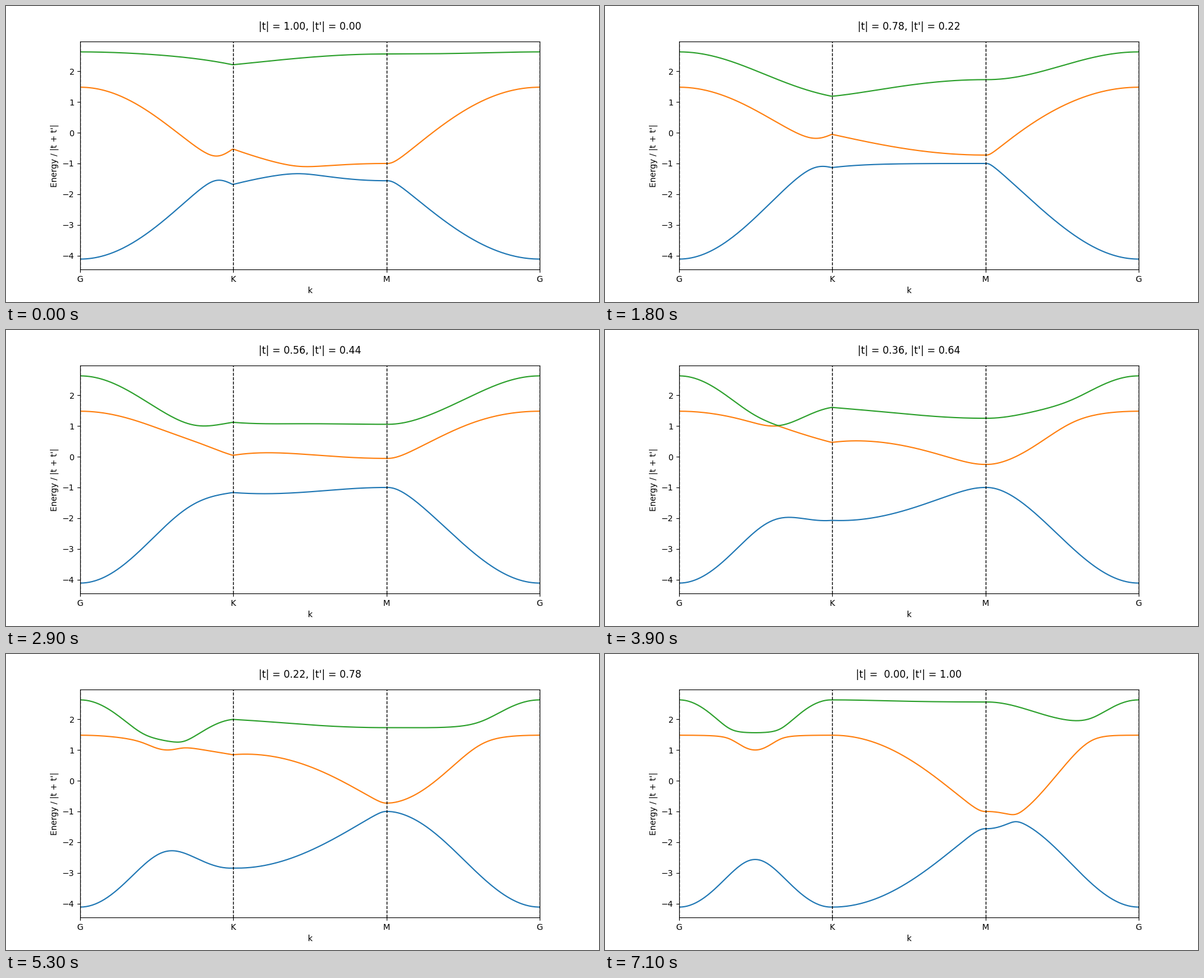
A matplotlib script that plays this animation: 1000x500 px, repeating every 9.1 s.

```python
import numpy as np
import matplotlib.pyplot as plt
from matplotlib.animation import FuncAnimation

STEP_MS = 50
HOLD = 15                    # frames a paused picture stays
PAUSES = {14: HOLD, 64: HOLD, 85: HOLD, 100: 40}
ONSITE = np.diag([-1.0, 0.0, 1.0])

# percentage of t' shown in each animation frame
percent = [n for n in range(101) for _ in range(PAUSES.get(n, 1))]

# phases k.a along the three bond directions of a kagome lattice
G = np.zeros(3)
K = np.pi / 3 * np.array([1, 1, -2])
M = np.pi / 2 * np.array([0, 1, -1])
path = np.concatenate([np.linspace(p, q, 100)
                       for p, q in ((G, K), (K, M), (M, G))])
near = np.cos(path)
far = np.cos(np.roll(path, -1, axis=1) - np.roll(path, -2, axis=1))


def bands(t, t2):
    """Sorted band energies along the path, one column per band."""
    hop = -2 * (t * near + t2 * far)
    ham = np.tile(ONSITE, (len(path), 1, 1))
    for bond, (i, j) in enumerate(((1, 2), (0, 2), (0, 1))):
        ham[:, i, j] = ham[:, j, i] = hop[:, bond]
    return np.linalg.eigvalsh(ham)


def caption(t, t2):
    gap = " " if t == 0 else ""
    return f"|t| = {gap}{t:.2f}, |t'| = {t2:.2f}"


plt.rcParams["font.family"] = "DejaVu Sans"
fig, ax = plt.subplots(figsize=(10, 5), dpi=100)
x = np.linspace(0, 3, len(path))
lines = ax.plot(x, bands(1, 0), lw=1.5)
for tick in range(4):
    ax.axvline(tick, color="black", ls="--", lw=1)
ax.set_xlim(0, 3)
ax.set_xticks(range(4), ["G", "K", "M", "G"])
ax.set_xlabel("k")
ax.set_ylabel("Energy / |t + t'|")
ax.set_ylim(ax.get_ylim())
title = ax.set_title(caption(1, 0), y=1.03)


def update(frame):
    n = percent[frame]
    t, t2 = (100 - n) / 100, n / 100
    for line, energy in zip(lines, bands(t, t2).T):
        line.set_ydata(energy)
    title.set_text(caption(t, t2))
    return [*lines, title]


anim = FuncAnimation(fig, update, frames=len(percent), interval=STEP_MS,
                     repeat=True, repeat_delay=0, blit=False)
plt.show()
```
